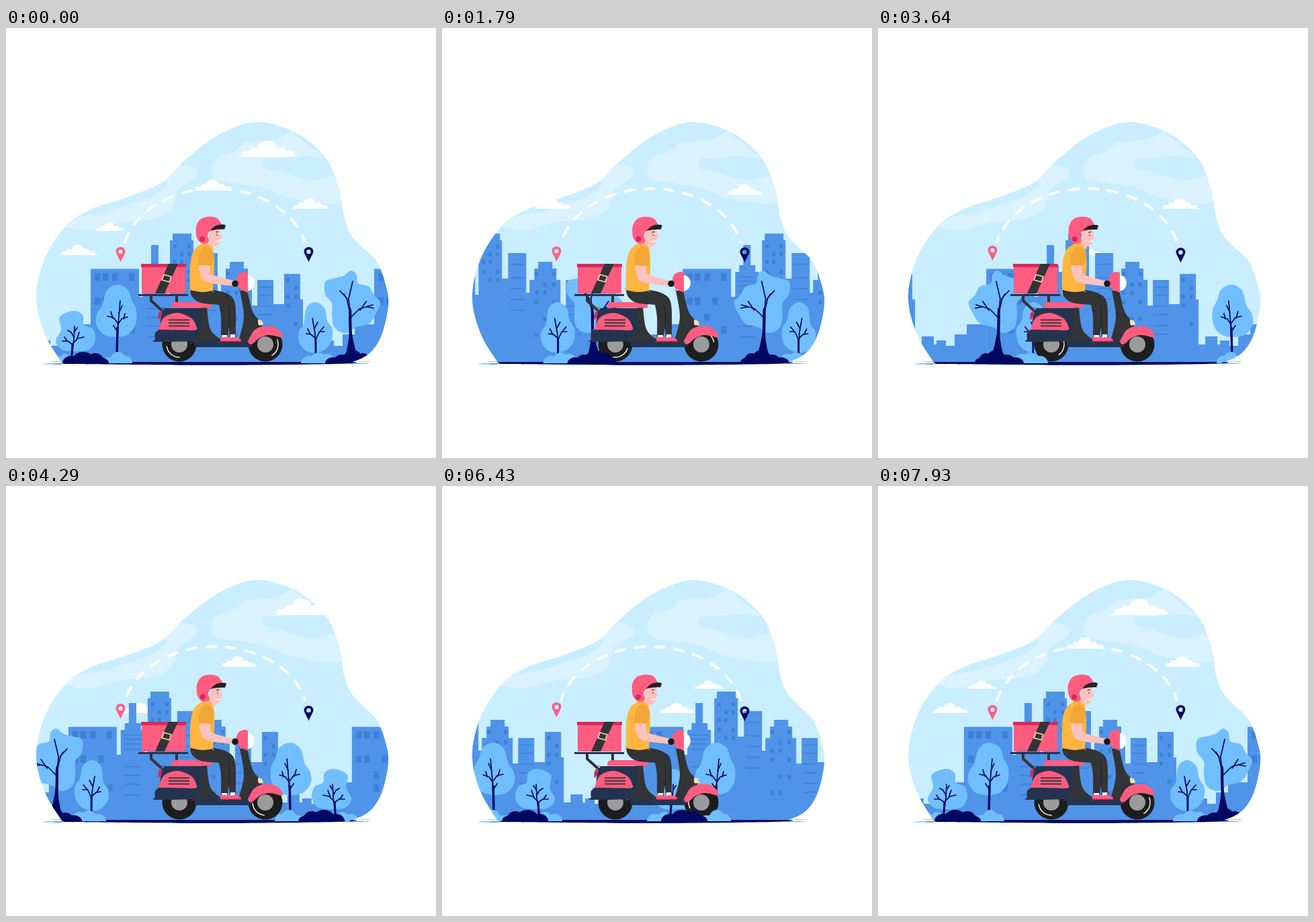
An HTML page with a canvas that plays this animation: 640 px wide and 640 px high, repeating every 8 s.

```html
<!DOCTYPE html>
<html lang="en">
<head>
<meta charset="utf-8">
<title>Scooter delivery</title>
<style>
  html, body { margin: 0; width: 100%; height: 100%; overflow: hidden; background: #fff; }
  canvas { display: block; width: 100%; height: 100%; }
</style>
</head>
<body>
<canvas id="stage" width="640" height="640"></canvas>
<script>
const ctx = document.getElementById('stage').getContext('2d');
const LOOP = 8000, STEPS = 112, CYCLE = 111, TILE = 1280, BLOCK = 422, GROUND = 499;
const SKY = '#c9eeff', HAZE = '#daf3ff', CITY = '#4f94e8', GLASS = '#3f80da', LEAF = '#71beff';
const NAVY = '#010862', PINK = '#ff5c80', ROSE = '#d9295c', DARK = '#333436', SLATE = '#24344f';
const SKIN = '#fdc2bd', CREAM = '#f7dfae', WHITE = '#fff';

const pairs = list => list.flatMap((v, i) => i % 2 ? [] : [[v, list[i + 1]]]);

function poly(list, closed = true) {
  const path = new Path2D();
  for (const [x, y] of pairs(list)) path.lineTo(x, y);
  if (closed) path.closePath();
  return path;
}

// closed spline through the points; a repeated point makes a corner
function curve(list) {
  const pts = pairs(list), at = i => pts[(i + pts.length) % pts.length];
  const path = new Path2D();
  path.moveTo(...pts[0]);
  pts.forEach((p, i) => {
    const a = at(i - 1), q = at(i + 1), b = at(i + 2);
    path.bezierCurveTo(p[0] + (q[0] - a[0]) / 6, p[1] + (q[1] - a[1]) / 6,
      q[0] - (b[0] - p[0]) / 6, q[1] - (b[1] - p[1]) / 6, ...q);
  });
  return path;
}

function fill(path, color) {
  ctx.fillStyle = color;
  ctx.fill(path);
}
function stroke(path, color, width) {
  ctx.strokeStyle = color;
  ctx.lineWidth = width;
  ctx.stroke(path);
}
const line = (list, color, width) => stroke(poly(list, false), color, width);
function disc(x, y, r, color) {
  const path = new Path2D();
  path.arc(x, y, r, 0, 7);
  fill(path, color);
}
function rect(x, y, w, h, color) {
  ctx.fillStyle = color;
  ctx.fillRect(x, y, w, h);
}
function rounded(x, y, w, h, r, color) {
  const path = new Path2D();
  path.roundRect(x, y, w, h, r);
  fill(path, color);
}
function within(place, paint) {
  ctx.save();
  place();
  paint();
  ctx.restore();
}
const shifted = (x, y, paint) => within(() => ctx.translate(x, y), paint);

// ---- scenery ----
const frame = curve([84, 499, 84, 499, 58, 456, 45, 402, 57, 345, 88, 296, 126, 270, 180, 252,
  232, 230, 265, 198, 315, 160, 372, 140, 430, 155, 475, 192, 495, 237, 503, 280, 513, 307,
  531, 327, 552, 348, 565, 382, 569, 412, 559, 457, 540, 485, 510, 499, 510, 499]);
const hazes = [
  curve([84, 292, 110, 281, 150, 273, 185, 262, 220, 249, 240, 231, 233, 225, 252, 206,
    278, 207, 284, 222, 257, 240, 248, 267, 220, 284, 170, 289, 130, 300, 100, 299]),
  curve([306, 213, 312, 194, 343, 182, 356, 170, 400, 166, 425, 153, 425, 153, 475, 194, 475, 194,
    440, 191, 405, 194, 384, 195, 385, 208, 408, 214, 432, 222, 460, 226, 490, 222,
    500, 258, 460, 260, 420, 252, 380, 237, 335, 230, 312, 225])
];

const cloud = curve([-41, 0, -41, 0, -38, -8, -29, -9, -25, -15, -17, -14, -11, -22, -1, -24,
  9, -21, 13, -14, 21, -15, 27, -9, 37, -8, 41, 0, 41, 0]);
// centre, base line, width
const clouds = [[391, 192, 82], [309, 242, 56], [453, 269, 53], [155, 302, 42], [108, 338, 52],
  [739, 248, 52], [842, 185, 44], [893, 338, 52], [1038, 269, 52], [1134, 192, 82]];

// left edge and roof height of each step
const roofs = pairs([126, 358.5, 198, 400, 204, 363, 210, 353, 216, 323, 227, 353, 234, 363,
  239, 397, 244, 316, 248, 306, 276, 316, 279, 373, 288, 335, 315, 394, 320, 375, 327, 358,
  333, 348, 354, 358, 360, 375, 366, 413, 374, 375, 398, 411, 414, 366, 438, 404, 442, 471,
  452, 459, 470, 471, 474, 465, 488, 473, 501, 456, 519, 441]);
const skyline = poly([126, 500, ...roofs.flatMap(([x, y], i) =>
  [x, y, roofs[i + 1] ? roofs[i + 1][0] : 548.3, y]), 548.3, 500]);

const glass = new Path2D();
const stripes = (x, w, rows) => rows.forEach(y => glass.rect(x, y, w, 1.5));
const windows = (cols, rows) => rows.forEach((y, j) => cols.forEach((x, i) => {
  if ((i * 2 + j * 5) % 3 != 2) glass.rect(x, y, 5, 6);
}));
[[365, 132, 144, 158, 183], [401, 132, 144, 170], [425, 158], [444, 158, 183]]
  .forEach(([y, ...cols]) => cols.forEach(x => glass.rect(x, y, 8.5, 11)));
stripes(209, 25, [370, 376, 383, 391, 417, 430, 443, 459]);
windows([249, 259, 270], [322, 334, 345, 360, 372]);
stripes(291, 21, [351, 371, 387, 403, 419]);
windows([328, 340, 353], [363, 379, 391, 405, 430, 454]);
stripes(376, 21, [385, 397, 413, 426, 442, 455]);
windows([417, 429], [372, 384, 397, 410, 437]);

// crown outline, trunk, twigs
const trees = [
  { crown: [100, 421, 114, 427, 116, 441, 129, 448, 133, 464, 124, 478, 104, 481, 84, 479,
      74, 466, 82, 449, 80, 430],
    trunk: [3, 98, 488, 99, 471],
    twigs: [[98, 488, 101, 464, 102, 444], [99, 471, 92, 466, 84, 466], [100, 469, 107, 462, 116, 460],
      [101, 460, 97, 453, 92, 450], [105, 464, 109, 453], [102, 452, 106, 446], [91, 466, 87, 460]] },
  { crown: [165, 382, 181, 389, 187, 405, 194, 420, 193, 440, 183, 455, 165, 460, 145, 456,
      134, 440, 136, 424, 143, 414, 150, 391],
    trunk: [3.4, 165, 488, 166, 446],
    twigs: [[165, 488, 167, 440, 170, 406], [166, 439, 160, 431, 151, 429], [166, 442, 172, 433, 181, 430],
      [168, 424, 173, 413], [159, 432, 156, 422], [166, 452, 160, 443], [175, 433, 177, 425]] },
  { crown: [460, 408, 474, 417, 478, 435, 486, 449, 483, 469, 470, 481, 450, 482, 437, 469,
      436, 452, 443, 441, 447, 417],
    trunk: [2.8, 461, 488, 461, 463],
    twigs: [[461, 488, 460, 455, 456, 432], [461, 462, 454, 456, 447, 455], [461, 464, 466, 453, 473, 445],
      [459, 447, 464, 438], [467, 452, 474, 452], [453, 456, 449, 448]] },
  { crown: [514, 361, 522, 368, 524, 380, 540, 385, 548, 398, 557, 409, 550, 426, 540, 440,
      522, 445, 505, 454, 489, 446, 485, 428, 485, 410, 475, 396, 475, 378, 487, 373, 502, 369],
    trunk: [4, 513, 480, 512, 430],
    twigs: [[513, 435, 510, 403, 516, 377], [511, 420, 507, 402, 497, 391],
      [513, 431, 526, 418, 546, 412], [508, 404, 503, 396], [527, 420, 536, 407], [537, 415, 547, 417]] }
].map(tree => ({ ...tree, crown: curve(tree.crown) }));
const root = curve([505, 490, 505, 490, 511, 455, 510, 420, 514, 420, 515, 455, 523, 490, 523, 490]);

// centre, half width, height
const bushes = [
  [LEAF, [75, 12, 11], [88, 10, 14], [152, 12, 9], [167, 13, 17], [179, 9, 11],
    [451, 12, 11], [465, 13, 16], [478, 12, 14]],
  [NAVY, [97, 13, 11], [115, 18, 17], [133, 14, 15], [143, 10, 8],
    [487, 12, 9], [500, 13, 13], [516, 16, 20], [531, 12, 15], [539, 9, 8]]
];

function drawTrees() {
  for (const { crown, trunk: [width, ...stem], twigs } of trees) {
    fill(crown, LEAF);
    line(stem, NAVY, width);
    for (const twig of twigs) line(twig, NAVY, 1.7);
  }
  fill(root, NAVY);
}
function drawBushes() {
  for (const [color, ...lobes] of bushes) for (const [x, w, h] of lobes) {
    const lobe = new Path2D();
    lobe.ellipse(x, GROUND, w, h, 0, Math.PI, 0);
    fill(lobe, color);
  }
}
// each tile is followed by its mirror image
function forest(scroll, paint) {
  for (const x of [-scroll, TILE - scroll]) {
    shifted(x, 0, paint);
    within(() => { ctx.translate(x + TILE, 0); ctx.scale(-1, 1); }, paint);
  }
}
function drawClouds(scroll) {
  for (const x of [-scroll, TILE - scroll]) for (const [cx, y, w] of clouds)
    within(() => { ctx.translate(x + cx, y); ctx.scale(w / 82, w / 82); }, () => fill(cloud, WHITE));
}
function drawCity(scroll) {
  for (const k of [-1, 0, 1, 2]) shifted(k * BLOCK - scroll, 0, () => {
    fill(skyline, CITY);
    fill(glass, GLASS);
  });
}

function drawRoute(n) {
  const arc = new Path2D();
  const end = Math.asin(24 / 105);
  arc.ellipse(311, 344, 138, 105, 0, Math.PI + end, -end);
  ctx.setLineDash([17.2, 12]);
  ctx.lineDashOffset = -29.2 * 6 * n / CYCLE;
  ctx.lineCap = 'butt';
  stroke(arc, WHITE, 4);
  ctx.setLineDash([]);
}
const pin = curve([0, 0, 0, 0, -4, -8, -7, -15, -5, -20, 0, -22, 5, -20, 7, -15, 4, -8]);
pin.moveTo(3.2, -15);
pin.arc(0, -15, 3.2, 0, 7);
const drawPin = (x, y, color) => shifted(x, y, () => {
  ctx.fillStyle = color;
  ctx.fill(pin, 'evenodd');
});

// ---- scooter and rider ----
function wheel(x, y, angle) {
  disc(x, y, 25.5, '#1d1d1d');
  disc(x, y, 12, '#9b9b9d');
  const shine = new Path2D();
  shine.arc(x, y, 19, angle - 0.73, angle + 0.73);
  stroke(shine, WHITE, 1.4);
}

const chassis = curve([236, 417, 236, 417, 297, 417, 297, 417, 299, 443, 288, 466, 288, 466,
  224, 467, 222, 463, 222, 454, 229, 448, 229, 448, 231, 428]);
const belly = curve([291, 416, 299, 416, 299, 416, 305, 450, 325, 467, 325, 467, 277, 468, 277, 468, 290, 448]);
const engineCover = curve([227, 449, 227, 449, 235, 431, 255, 424, 276, 432, 284, 446,
  283, 449, 278, 450, 278, 450]);
const tailLamp = curve([227, 434, 227, 425, 232, 419, 232, 419, 231, 430, 231, 430]);
const strap = poly([242, 351, 256, 351, 236, 395, 222, 395]);
const buckle = poly([235, 367, 246, 370, 243, 378, 232, 375]);
const column = curve([348, 391, 348, 391, 359, 390, 359, 390, 367, 422, 379, 437, 381, 444, 381, 444,
  369, 451, 360, 466, 360, 466, 346, 466, 346, 466, 354, 430]);
const headLamp = curve([375, 434, 375, 434, 381, 436, 383, 442, 383, 442, 376, 442]);
const fender = curve([360, 466, 360, 466, 372, 448, 394, 443.5, 408, 451, 412, 460, 409, 460.5,
  392, 457, 378, 461, 367, 470, 362, 470]);
const cowl = curve([345, 368, 353, 363, 360, 364, 360, 364, 360, 394, 360, 394, 348, 388, 343, 378]);

function drawScooter(turn) {
  wheel(258, 471, turn + 2.27);
  wheel(386, 471, turn + 0.33);
  line([216, 398, 216, 406, 237, 425], DARK, 4);
  line([254, 398, 254, 410], DARK, 4);
  line([197, 397.5, 271, 397.5], SLATE, 3);
  fill(chassis, SLATE);
  fill(belly, DARK);
  rounded(281, 464, 84, 11, 3, SLATE);
  fill(engineCover, PINK);
  for (const y of [434.5, 439, 443.5]) line([242, y, 273, y], DARK, 1.8);
  fill(tailLamp, ROSE);
  rounded(246, 408, 60, 8.5, [6, 5, 0, 0], PINK);

  rect(202, 353, 65, 42, PINK);
  rect(201, 351, 67, 5, ROSE);
  fill(strap, DARK);
  stroke(buckle, CREAM, 1.7);

  fill(column, DARK);
  fill(headLamp, CREAM);
  fill(fender, PINK);
}

const legs = curve([274, 388, 274, 388, 290, 391, 308, 390, 330, 396, 341, 411, 342, 458, 342, 458,
  333, 458, 333, 458, 331, 445, 329, 460, 329, 460, 320, 460, 320, 460, 320, 430, 317, 412,
  317, 412, 290, 409, 277, 400]);
const shoes = curve([319, 467, 319, 467, 320, 461, 327, 460, 333, 461, 340, 460, 349, 463,
  350, 467, 350, 467]);
const neck = poly([299, 315, 310, 315, 310, 328, 304, 330, 299, 325]);
const shirt = curve([290, 322, 299, 320, 307, 327, 310, 350, 308, 391, 308, 391, 292, 393, 274, 390,
  274, 390, 274, 355, 279, 332]);
const face = curve([304, 300, 304, 300, 319, 297, 319, 297, 319.5, 306, 322, 312, 319, 314,
  317, 322, 311, 325, 304, 323, 301, 317]);
const helmet = curve([300, 281, 314, 283, 322, 294, 322, 294, 305, 300, 305, 300, 300, 308, 302, 317,
  298, 320.5, 291, 320.5, 284, 312, 283, 296, 289, 285]);
const visor = curve([303, 302, 303, 302, 313, 294, 326, 293, 325, 299.5, 325, 299.5, 313, 300]);
const arm = curve([287, 352, 287, 352, 304, 352, 304, 352, 304, 362, 309, 368, 339, 376, 339, 376,
  339, 384, 339, 384, 301, 379, 290, 369]);
const sleeve = curve([293, 327, 304, 327, 309, 338, 306, 354, 306, 354, 286, 353, 286, 353, 287, 339]);

function drawRider(lean) {
  fill(legs, DARK);
  line([329, 459, 333, 436, 332, 413], '#1f2022', 1);
  rect(321, 457, 8, 5, '#ffe9e6');
  rect(334, 456, 7, 5, '#ffe9e6');
  fill(shoes, PINK);
  rect(319, 465.5, 31, 1.5, ROSE);

  within(() => {
    ctx.translate(290, 390);
    ctx.rotate(lean);
    ctx.translate(-290, -390);
  }, () => {
    fill(neck, SKIN);
    fill(shirt, '#ffb640');
    fill(face, SKIN);
    fill(helmet, PINK);
    fill(visor, '#202126');
    disc(292, 314, 4, ROSE);
    line([312, 304, 316, 303], DARK, 1.2);
    line([314, 307, 314, 309], DARK, 1.2);
    line([311, 317, 315, 318, 318, 316], WHITE, 1.5);
    fill(arm, SKIN);
    fill(sleeve, '#f2a636');
  });

  fill(cowl, PINK);
  const lamp = new Path2D();
  lamp.ellipse(360, 379.5, 10, 11.5, 0, -Math.PI / 2, Math.PI / 2);
  fill(lamp, WHITE);
  disc(341, 380.5, 4.8, '#18181a');
}

const bounce = (n, times) => Math.sin(Math.PI * times * n / CYCLE) ** 2;
const road = curve([83, 497, 83, 497, 300, 497, 524, 497, 524, 497, 490, 500, 300, 501.8, 86, 500, 86, 500]);
const clipped = paint => within(() => ctx.clip(frame), paint);

function draw(now) {
  // the motion advances in fourteen steps a second
  const n = Math.floor((now % LOOP + 5) * STEPS / LOOP) % STEPS;
  const scroll = TILE * n / CYCLE % TILE;
  ctx.clearRect(0, 0, 640, 640);
  ctx.lineCap = ctx.lineJoin = 'round';
  fill(frame, SKY);
  clipped(() => {
    for (const haze of hazes) fill(haze, HAZE);
    drawClouds(scroll);
    drawCity(7.586 * n % BLOCK);
    forest(scroll, drawTrees);
  });
  drawRoute(n);
  const hop = bounce(n, 4);
  drawPin(170.5, 348 - 8.5 * hop, PINK);
  drawPin(450.5, 348 + 4 * hop, NAVY);
  fill(road, NAVY);
  drawScooter(Math.PI * 16 * n / CYCLE);
  drawRider(bounce(n, 32) * Math.PI / 180);
  clipped(() => forest(scroll, drawBushes));
}

const start = performance.now();
(function tick() {
  draw(performance.now() - start);
  requestAnimationFrame(tick);
})();
</script>
</body>
</html>
```
